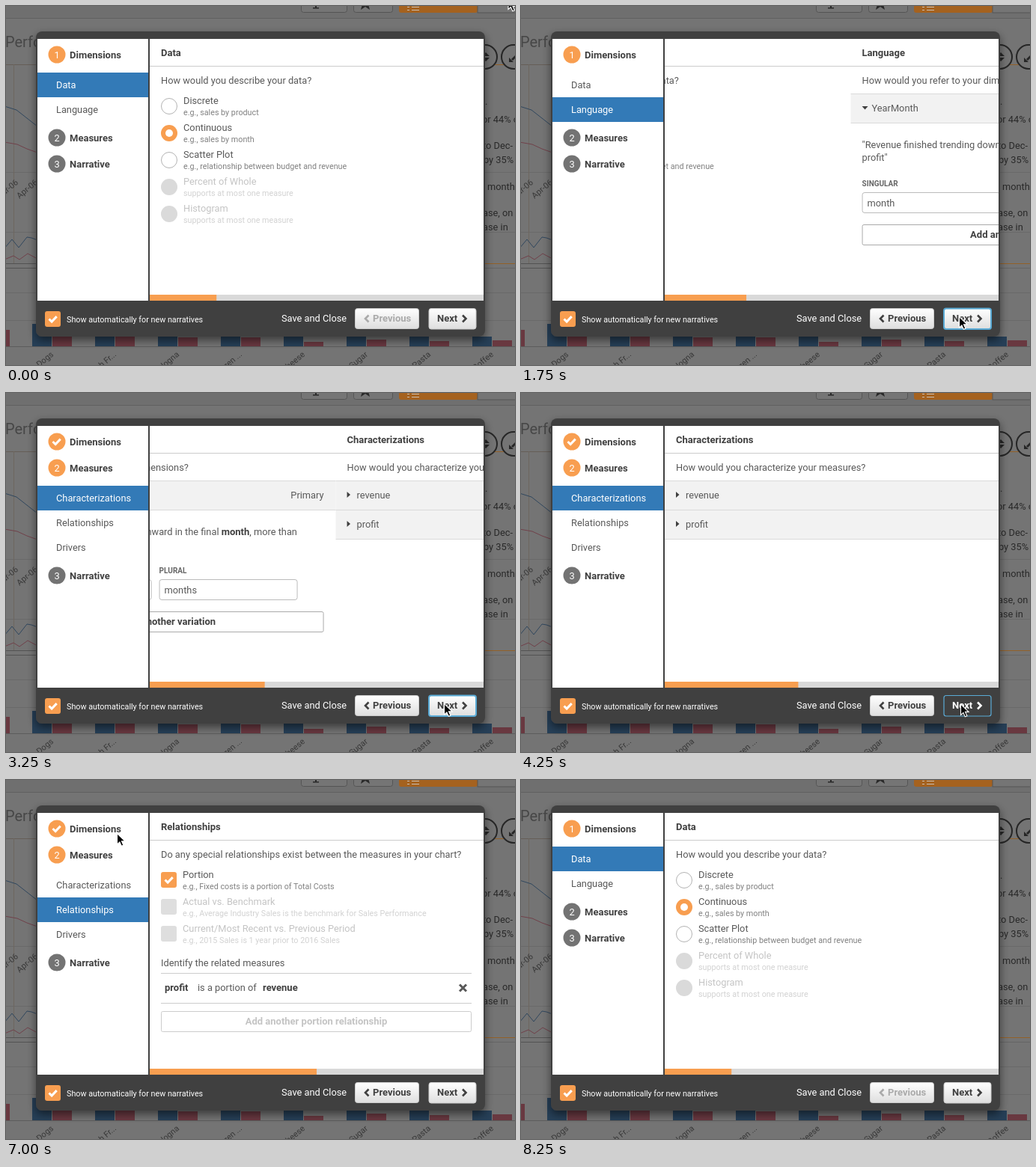
An HTML page that plays this animation: 680x480 px, repeating every 9 s.

```html
<!DOCTYPE html>
<html lang="en">
<head>
<meta charset="utf-8">
<title>Narrative wizard</title>
<style>
  html, body { margin: 0; width: 100%; height: 100%; overflow: hidden; background: #747474; }
  svg { display: block; width: 680px; height: 480px; }
  text { font: 12.8px Roboto, sans-serif; fill: #595959; white-space: pre; }
  .bold { font-weight: 700; font-size: 13px; fill: #404040; }
  .small { font-size: 10.75px; fill: #808080; }
  .tiny { font-size: 10px; font-weight: 700; fill: #666; }
  .off { fill: #c4c4c4; }
  .small.off { fill: #d2d2d2; }
  .white { fill: #fff; }
  .mid { text-anchor: middle; }
  .end { text-anchor: end; }
  .tick { fill: none; stroke: #fff; stroke-width: 3; }
  .chevron { fill: none; stroke: currentColor; stroke-width: 2.6; }
  .button text { fill: currentColor; }
  .backdrop text { fill: #292929; }
  .backdrop .axis { font-size: 11px; fill: #383838; }
  .backdrop .heading { font-size: 20px; fill: #474747; }
  .line { fill: none; stroke-width: 1; }
</style>
</head>
<body>
<svg viewBox="0 0 680 480" xmlns="http://www.w3.org/2000/svg">
  <defs>
    <linearGradient id="face" x2="0" y2="1">
      <stop stop-color="#fff"/><stop offset="1" stop-color="#dedede"/>
    </linearGradient>
    <clipPath id="content"><rect x="192" y="44" width="446" height="350"/></clipPath>
    <filter id="shadow" x="-10%" y="-10%" width="120%" height="125%">
      <feDropShadow dx="0" dy="5" stdDeviation="6" flood-opacity=".5"/>
    </filter>
  </defs>
  <g id="backdrop" class="backdrop"></g>
  <rect x="40" y="34" width="600" height="408" rx="8" fill="#404040" filter="url(#shadow)"/>
  <rect x="42" y="44" width="148" height="350" fill="#fff"/>
  <rect x="192" y="44" width="446" height="350" fill="#fff"/>
  <g id="menus"></g>
  <g clip-path="url(#content)">
    <path d="M192 80.5H638" stroke="#ccc"/>
    <g id="pages"></g>
    <rect x="192" y="386" width="446" height="8" fill="#d9d9d9"/>
    <rect id="bar" x="192" y="386" height="8" fill="#f89e50"/>
  </g>
  <g id="footer"></g>
  <path id="cursor" d="M0 0V14.5L3.4 11.4L5.8 16.8L8.4 15.7L6 10.4H10.6Z" fill="#000" stroke="#fff" stroke-width="1.1"/>
</svg>
<script>
const ORANGE = '#f89e50', BLUE = '#337ab7', GREY = '#737373';
const LOOP = 9000, STEP = 250, SLIDE = 600, BAR_LAG = 120, WIDTH = 446;
const $ = id => document.getElementById(id);

const text = (x, y, s, cls = '') => `<text x="${x}" y="${y}" class="${cls}">${s}</text>`;
const rect = (x, y, w, h, fill, stroke = 'none', rx = 0) =>
  `<rect x="${x}" y="${y}" width="${w}" height="${h}" rx="${rx}" fill="${fill}" stroke="${stroke}"/>`;
const circle = (x, y, r, fill, stroke = 'none') =>
  `<circle cx="${x}" cy="${y}" r="${r}" fill="${fill}" stroke="${stroke}"/>`;
const line = (d, stroke) => `<path class="line" d="${d}" stroke="${stroke}"/>`;
const shape = (d, fill = '#404040') => `<path d="${d}" fill="${fill}"/>`;
const tick = (x, y) => `<path class="tick" d="M${x - 5} ${y}l3.6 3.6l6.6 -7"/>`;
const checkbox = (x, y) => rect(x, y, 21, 21, ORANGE, 'none', 3) + tick(x + 10.5, y + 10.5);

// Dimmed page behind the dialog
function backdrop() {
  const bars = ['Hot Dogs', 'Fresh Fr...', 'Bologna', 'Frozen ...', 'Cheese', 'Sugar', 'Pasta', 'Coffee']
    .map((name, i) => {
      const x = 35 + 84 * i, blueTop = i ? 442 : 425, redTop = [432, 433, 443, 443, 449, 446, 448, 447][i];
      return rect(x, blueTop, 26, 455 - blueTop, '#263f57') + rect(x + 27, redTop, 26, 455 - redTop, '#693840') +
        `<text class="axis end" transform="translate(${x + 29} 467) rotate(-40)">${name}</text>`;
    }).join('');
  const grid = [222, 302, 383, 420].map(y => line(`M0 ${y}.5H680`, '#696969')).join('');
  const notes = [[640, 132, '.'], [636, 156, 'or 44% of'], [637, 191, 'to Dec-'], [638, 210, 'by 35%'],
    [643, 246, 'month'], [637, 281, 'ase, on'], [637, 300, 'ase in']].map(n => text(...n)).join('');
  return rect(0, 0, 680, 480, '#747474') + rect(0, 0, 680, 16, '#6f6f6f') + line('M0 16.5H680', '#606060') +
    rect(394.5, -15, 61, 23.5, '#757575', '#555', 3) + rect(464.5, -15, 52, 23.5, '#757575', '#555', 3) +
    rect(525, -15, 105, 24, '#a5621f', 'none', 3) + rect(630, -15, 60, 24, '#757575', '#555') +
    shape('M410 2H418V3.5H410ZM413 -3H415V3H413Z', '#292929') + shape('M474 5L476 -2H484L486 5L480 1Z', '#292929') +
    line('M536 1.5H539M542 1.5H552M536 5.5H539M542 5.5H552', '#c9bcae') +
    text(-1, 55, 'Performance', 'heading') + line('M0 78.5H40', '#665e57') + line('M640 78.5H680', '#936027') +
    grid + line('M10.5 78V344', '#6d665f') +
    line('M-2 134L14 139L28 150L42 161', '#30475e') + line('M-2 182L15 185L28 191L42 196', '#70414a') +
    line('M-2 324L8 312L17 323L28 309L34 310L42 313', '#30475e') +
    line('M-2 339L10 334L18 339L29 331L42 338', '#70414a') +
    line('M0 344.5H40M0 350.5H40', '#525252') + line('M640 344.5H680', '#936027') + line('M640 350.5H680', '#646464') +
    ['Mar-06', 'Apr-06'].map((s, i) =>
      `<text class="axis end" transform="translate(${17 + 26 * i} 237) rotate(-40)">${s}</text>`).join('') +
    [640, 678].map(x => `<circle cx="${x}" cy="68" r="16" fill="#747474" stroke="#262626" stroke-width="2"/>`).join('') +
    shape('M641 62L646 67H636ZM641 74L646 69H636Z', '#262626') + shape('M672 69V75H678ZM675 71L680 66L682 68L677 73Z', '#262626') +
    notes + line('M0 455.5H680', '#5c5c5c') + rect(0, 433, 5, 22, '#693840') + bars;
}

// Sidebar
const badge = (y, mark, label, color = GREY) => circle(68, y, 11.5, color) +
  (mark ? text(68, y + 4.5, mark, 'mid white') : tick(67.5, y)) + text(85, y + 5, label, 'bold');
const items = (top, names, active) => names.map((name, i) =>
  (i === active ? rect(42, top + 33 * i, 148, 33, BLUE) : '') +
  text(67, top + 33 * i + 21, name, i === active ? 'white' : '')).join('');
const dimensionsMenu = active => badge(65, '1', 'Dimensions', ORANGE) +
  items(89, ['Data', 'Language'], active) + badge(176, '2', 'Measures') + badge(211, '3', 'Narrative');
const measuresMenu = active => badge(65, '', 'Dimensions', ORANGE) + badge(100, '2', 'Measures', ORANGE) +
  items(124, ['Characterizations', 'Relationships', 'Drivers'], active) + badge(244, '3', 'Narrative');

// Pages
const heading = (title, question) => text(207, 67, title, 'bold') + text(207, 104, question);
const option = (x, i, label, hint, off = '') =>
  text(x, 131 + 36 * i, label, off) + text(x, 146 + 36 * i, hint, 'small ' + off);
const strip = (y, label) => rect(192, y, WIDTH, 39, '#f2f2f2') +
  line(`M192 ${y + .5}H638M192 ${y + 39.5}H638`, '#dadada') + text(220, y + 24, label);
const wideButton = (y, label, off = '') => rect(207.5, y + .5, 414, 27, '#fff', off ? '#ccc' : '#aaa', 2) +
  text(414.5, y + 18, label, 'bold mid ' + off);
const field = (x, label, value) => text(x, 241, label, 'tiny') +
  rect(x + .5, 249.5, 184, 27, '#fff', '#bbb', 3) + text(x + 7, 268, value);

const dataPage = () => heading('Data', 'How would you describe your data?') +
  [['Discrete', 'e.g., sales by product'], ['Continuous', 'e.g., sales by month'],
   ['Scatter Plot', 'e.g., relationship between budget and revenue'],
   ['Percent of Whole', 'supports at most one measure', 'off'],
   ['Histogram', 'supports at most one measure', 'off']].map((o, i) => {
    const y = 134 + 36 * i;
    const mark = i === 1 ? circle(218, y, 11, ORANGE) + circle(218, y, 5, '#fff')
      : o[2] ? circle(218, y, 11, '#dadada') : circle(218, y, 10.5, '#fff', '#b3b3b3');
    return mark + option(237, i, ...o);
  }).join('');

const languagePage = () => heading('Language', 'How would you refer to your dimensions?') +
  strip(117, 'YearMonth') + shape('M207 134H215L211 138.5Z') + text(622, 141, 'Primary', 'end') +
  text(207, 190, '"Revenue finished trending downward in the final <tspan class="bold">month</tspan>, more than') +
  text(207, 207, 'profit"') + field(207, 'SINGULAR', 'month') + field(402, 'PLURAL', 'months') +
  wideButton(292, 'Add another variation');

const characterPage = () => heading('Characterizations', 'How would you characterize your measures?') +
  ['revenue', 'profit'].map((s, i) => strip(117 + 39 * i, s) +
    shape(`M207 ${132 + 39 * i}v8l4.5 -4z`)).join('');

const relationPage = () =>
  heading('Relationships', 'Do any special relationships exist between the measures in your chart?') +
  [['Portion', 'e.g., Fixed costs is a portion of Total Costs'],
   ['Actual vs. Benchmark', 'e.g., Average Industry Sales is the benchmark for Sales Performance', 'off'],
   ['Current/Most Recent vs. Previous Period', 'e.g., 2015 Sales is 1 year prior to 2016 Sales', 'off']]
    .map((o, i) => (i ? rect(207, 159 + 36 * (i - 1), 21, 21, '#dedede', 'none', 3) : checkbox(207, 123)) +
      option(236, i, ...o)).join('') +
  text(207, 249, 'Identify the related measures') + line('M207 258.5H622M207 298.5H622', '#ccc') +
  text(212, 282, 'profit', 'bold') + text(256, 282, 'is a portion of') + text(343, 282, 'revenue', 'bold') +
  '<path d="M606 273.5l9 9m0 -9l-9 9" stroke="#595959" stroke-width="3"/>' +
  wideButton(309, 'Add another portion relationship', 'off');

const footer = () => checkbox(52, 408) +
  text(81, 423, 'Show automatically for new narratives', 'small white') + text(368, 422, 'Save and Close', 'white') +
  '<g id="previous" class="button">' + rect(466.5, 404.5, 85, 27, 'url(#face)', '#ccc', 3) +
  '<path class="chevron" d="M484.5 413.5l-4.5 4.5l4.5 4.5"/>' + text(490, 422, 'Previous', 'bold') + '</g>' +
  '<g id="next" class="button"><rect id="nextFace" x="565" y="404.5" width="63" height="27.5" rx="3"/>' +
  '<path class="chevron" d="M610 413.5l4.5 4.5l-4.5 4.5"/>' + text(576, 422, 'Next', 'bold') + '</g>';

const groups = list => list.map(s => `<g>${s}</g>`).join('');
$('backdrop').innerHTML = backdrop();
$('menus').innerHTML = groups([dimensionsMenu(0), dimensionsMenu(1), measuresMenu(0), measuresMenu(1)]);
$('pages').innerHTML = groups([dataPage(), languagePage(), characterPage(), relationPage()]);
$('footer').innerHTML = footer();
const menus = [...$('menus').children], pages = [...$('pages').children];

// Timing
const clamp = v => Math.min(1, Math.max(0, v));
const mix = (a, b, p) => a + (b - a) * p;
const bezier = (x1, y1, x2, y2) => x => {
  const curve = (a, b, s) => 3 * a * s * (1 - s) ** 2 + 3 * b * s * s * (1 - s) + s ** 3;
  let low = 0, high = 1;
  for (let i = 0; i < 24; i++) {
    const s = (low + high) / 2;
    if (curve(x1, x2, s) < x) low = s; else high = s;
  }
  return curve(y1, y2, high);
};
const ease = bezier(.25, .1, .25, 1), easeInOut = bezier(.42, 0, .58, 1);
const visits = [[-2000, 0], [1470, 1], [2970, 2], [4270, 3], [7020, 0]];
const path = [[0, 671, -10], [1250, 585.5, 415.5], [3750, 585.5, 415.5], [4000, 587.5, 416],
  [5500, 587.5, 416], [6750, 148.5, 71.5], [LOOP, 148.5, 71.5]];
const share = page => .2 + .1 * page;

function draw(t) {
  const now = visits.findLastIndex(v => v[0] <= t);
  const [start, to] = visits[now], from = now ? visits[now - 1][1] : to;
  const p = easeInOut(clamp((t - start) / SLIDE)), dir = to < from ? -1 : 1;
  menus.forEach((m, i) => m.style.display = i === to ? '' : 'none');
  pages.forEach((page, i) => {
    const x = i === to ? dir * WIDTH * (1 - p) : -dir * WIDTH * p;
    page.style.display = i === to || i === from && p < 1 ? '' : 'none';
    page.setAttribute('transform', `translate(${x})`);
  });
  const filled = ease(clamp((t - start - BAR_LAG) / SLIDE));
  $('bar').setAttribute('width', WIDTH * mix(share(from), share(to), filled));

  const pressed = t >= 2750 && t < 3000 || t >= 4000 && t < 4500;
  const focused = t >= 1500 && t < 7000;
  $('previous').style.color = to ? '#404040' : '#aaa';
  $('next').style.color = pressed ? '#fff' : '#404040';
  $('nextFace').style.cssText = `fill:${pressed ? '#404040' : 'url(#face)'};` +
    (focused ? `stroke:#5aabd6;stroke-width:${pressed ? 1.2 : 2}` : 'stroke:#ccc');

  const leg = Math.max(1, path.findIndex(k => k[0] > t));
  const [t0, x0, y0] = path[leg - 1], [t1, x1, y1] = path[leg];
  const q = easeInOut((t - t0) / (t1 - t0));
  $('cursor').setAttribute('transform', `translate(${mix(x0, x1, q)} ${mix(y0, y1, q)})`);
  $('cursor').style.display = t < 8250 ? '' : 'none';
}

const begin = performance.now();
function tickClock() {
  const t = (performance.now() - begin) % LOOP;
  draw(Math.floor(t / STEP) * STEP);
  requestAnimationFrame(tickClock);
}
tickClock();
</script>
</body>
</html>
```
